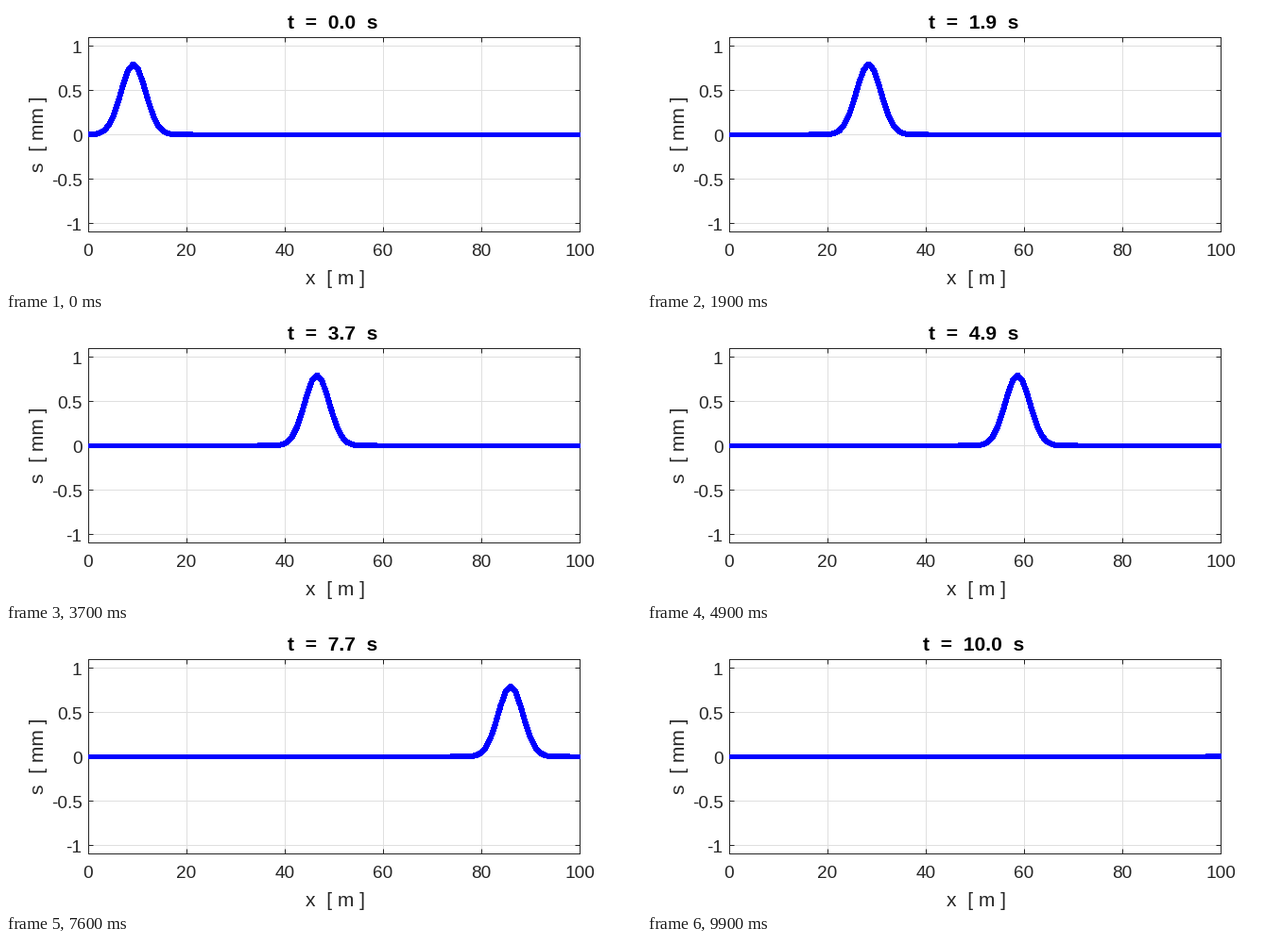
A matplotlib script that plays this animation: 672x300 px, repeating every 10000 ms.

```python
import numpy as np
import matplotlib.pyplot as plt
from matplotlib.animation import FuncAnimation
from matplotlib.transforms import Affine2D

W, H, DPI = 672, 300, 100
FRAMES, INTERVAL = 100, 100
LEFT, RIGHT, TOP, BOTTOM = 87, 607, 33, 239
INK = "#262626"
TICK_PX, LABEL_PX = 19, 21

plt.rcParams["font.family"] = "Liberation Sans"


def pt(px):
    return px * 72 / DPI


fig = plt.figure(figsize=(W / DPI, H / DPI), dpi=DPI, facecolor="white")
ax = fig.add_axes([LEFT / W, 1 - BOTTOM / H,
                   (RIGHT - LEFT) / W, (BOTTOM - TOP) / H])
ax.set(xlim=(0, 100), ylim=(-1.1, 1.1),
       xticks=range(0, 101, 20), yticks=[-1, -0.5, 0, 0.5, 1])
ax.set_axisbelow(True)
ax.grid(color="#dfdfdf", lw=pt(1))
ax.tick_params(direction="in", top=True, right=True, length=pt(5),
               width=pt(1), color=INK, labelbottom=False, labelleft=False)
for spine in ax.spines.values():
    spine.set(color=INK, linewidth=pt(1))


def write(x, y, text, size, ha="center", color=INK, **kw):
    """Place text by its baseline, in pixels from the top left."""
    return fig.text(x / W, 1 - y / H, text, fontsize=pt(size), ha=ha,
                    va="baseline", color=color, **kw)


for v in ax.get_xticks():
    write(LEFT + v / 100 * (RIGHT - LEFT), 265, f"{v:g}", TICK_PX)
for v in ax.get_yticks():
    y = TOP + (1.1 - v) / 2.2 * (BOTTOM - TOP)
    write(80.5, y + 8, f"{v:g}", TICK_PX, ha="right")

write(348.5, 295, "x  [ m ]", LABEL_PX)
write(40, 135.5, "s  [ mm ]", LABEL_PX, rotation=90, rotation_mode="anchor")
title = write(345.6, 24, "", LABEL_PX, color="black", weight="bold")

# The pulse moves by one sample per frame; the half pixel shift
# centres its stroke on the snapped axes lines.
x = np.linspace(0, 100, FRAMES)
half_pixel = Affine2D().translate(0.5, -0.5)
wave, = ax.plot(x, 0 * x, color="#0000ff", lw=pt(5), zorder=3,
                solid_capstyle="butt", clip_on=False, snap=False,
                antialiased=False, transform=ax.transData + half_pixel)


def update(i):
    t = 10 * i / (FRAMES - 1)
    wave.set_ydata(0.8 * np.exp(-(x - x[9] - 10 * t) ** 2 / 12.5))
    title.set_text(f"t  =  {t:.1f}  s")
    return wave, title


anim = FuncAnimation(fig, update, frames=FRAMES, interval=INTERVAL,
                     repeat=True, repeat_delay=0)
plt.show()
```
